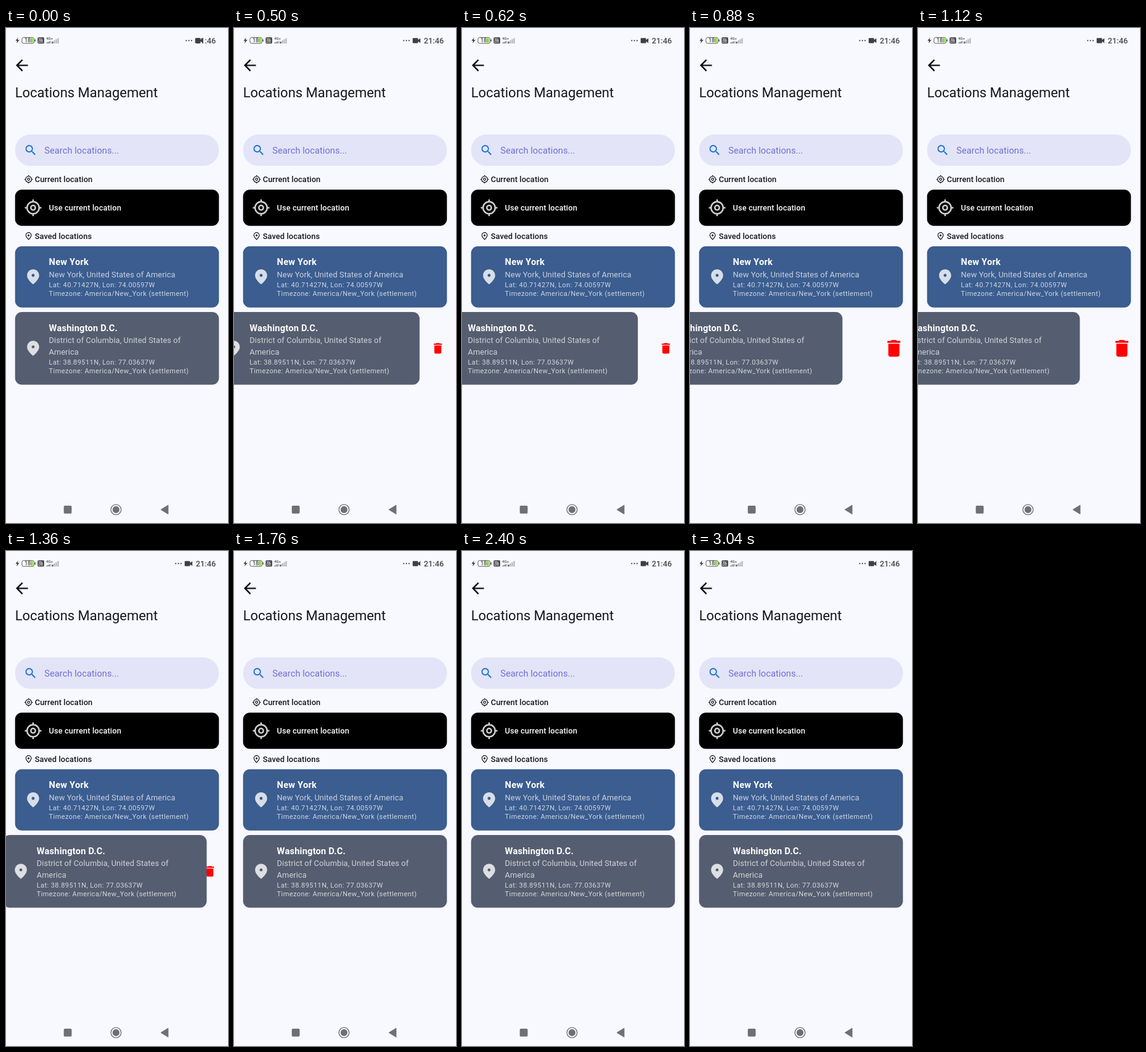
Write an HTML page that moves like this. It is 360 by 800 pixels and loops after 3240 ms.

```html
<!DOCTYPE html>
<html lang="en">
<head>
<meta charset="utf-8">
<title>Locations Management</title>
<style>
  html, body { margin: 0; width: 100%; height: 100%; overflow: hidden; background: #f8f8ff; }
  svg { display: block; width: 360px; height: 800px; }
  text { font-family: Roboto, "Noto Sans", sans-serif; fill: #15161b; white-space: pre; }
  .title { font-size: 22px; }
  .head { font-size: 12.83px; font-weight: 500; letter-spacing: .09px; }
  .hint { font-size: 14.67px; letter-spacing: .04px; fill: #706fd2; }
  .card text { fill: #fff; }
  .card .name { font-size: 14.67px; font-weight: 700; letter-spacing: .2px; }
  .card .body { font-size: 12.83px; letter-spacing: .09px; fill-opacity: .72; }
  .card .small { font-size: 11px; letter-spacing: .42px; fill-opacity: .75; }
  .status text { font-weight: 500; fill: #47474b; }
</style>
</head>
<body>
<svg viewBox="0 0 360 800">
  <defs>
    <path id="pin" d="M12 2c-4.2 0-8 3.22-8 8.2 0 3.18 2.45 6.92 7.34 11.23.38.33.95.33 1.33 0C17.55 17.12 20 13.38 20 10.2 20 5.22 16.2 2 12 2zm0 10c-1.1 0-2-.9-2-2s.9-2 2-2 2 .9 2 2-.9 2-2 2z"/>
    <g id="gps" fill="none" stroke-width="2">
      <circle cx="12" cy="12" r="8"/>
      <circle cx="12" cy="12" r="3"/>
      <path d="M12 1v3M12 20v3M1 12h3M20 12h3"/>
    </g>
  </defs>
  <rect width="360" height="800" fill="#f8f8ff"/>

  <g class="status">
    <path d="M19.5 15.5l-4 5.2h2.6l-1 4.3 4.6-5.7h-2.8z" fill="#3c3c40"/>
    <rect x="25.9" y="15.4" width="19.6" height="9.4" rx="2.8" fill="#fff" stroke="#56565a"/>
    <rect x="40" y="16.6" width="3.8" height="7" rx="1" fill="#7be02a"/>
    <rect x="46.4" y="18.3" width="1.5" height="3.6" rx=".7" fill="#56565a"/>
    <text x="30" y="23.4" font-size="9">18</text>
    <rect x="51.3" y="15" width="10.6" height="10.2" rx="1.6" fill="#48484c"/>
    <text x="53" y="19.8" font-size="5" style="fill:#fff">Vo</text>
    <text x="52.5" y="24.4" font-size="4.6" style="fill:#fff">LTE</text>
    <text x="65" y="19" font-size="6">4G+</text>
    <g id="bars"></g>
    <text x="307.8" y="25" font-size="12.8">21:46</text>
    <g id="rec" fill="#3f3f43">
      <circle cx="275.3" cy="20.3" r="1.1"/>
      <circle cx="279.6" cy="20.3" r="1.1"/>
      <circle cx="283.9" cy="20.3" r="1.1"/>
      <rect x="289.7" y="16.3" width="8.8" height="8.2" rx="1.2"/>
      <path d="M298 19.6l4.2-3v7.6l-4.2-3z"/>
    </g>
  </g>

  <path transform="translate(11.1 45.7) scale(1.222)" d="M20 11H7.83l5.59-5.59L12 4l-8 8 8 8 1.41-1.41L7.83 13H20z" fill="#111217"/>
  <text class="title" x="14.67" y="112">Locations Management</text>

  <rect x="14.7" y="172" width="330.6" height="50.8" rx="25" fill="#e4e4f8"/>
  <path transform="translate(28.7 186.2) scale(.94)" d="M15.5 14h-.79l-.28-.27A6.47 6.47 0 0 0 16 9.5 6.5 6.5 0 1 0 9.5 16c1.61 0 3.09-.59 4.23-1.57l.27.28v.79l5 4.99L20.49 19zm-6 0a4.5 4.5 0 1 1 0-9 4.5 4.5 0 0 1 0 9z" fill="#1976d2"/>
  <text class="hint" x="62.3" y="202.8">Search locations...</text>

  <use href="#gps" transform="translate(29.3 237.2) scale(.611)" stroke="#15161b"/>
  <text class="head" x="46.7" y="249">Current location</text>
  <g class="card">
    <rect x="14.7" y="261.2" width="330.6" height="58.6" rx="11" fill="#000"/>
    <use href="#gps" transform="translate(29.3 275.8) scale(1.222)" stroke="#d0d0d0"/>
    <text class="head" x="69.5" y="295">Use current location</text>
  </g>
  <g transform="translate(29.3 329) scale(.611)" fill="none" stroke="#15161b" stroke-width="2">
    <path d="M12 21C8 17 5 13.500 5 9.800a7 7 0 0 1 14 0C19 13.500 16 17 12 21z"/>
    <circle cx="12" cy="10" r="1.700"/>
  </g>
  <text class="head" x="46.7" y="340.9">Saved locations</text>

  <path id="bin" fill="#f00" d="M6 19c0 1.100.9 2 2 2h8c1.100 0 2-.9 2-2V7H6zM19 4h-3.500l-1-1h-5l-1 1H5v2h14z"/>
  <g class="card" id="first"></g>
  <g class="card" id="second"></g>

  <g fill="#707074">
    <rect x="93.700" y="772" width="12.800" height="12.800" rx="1.800"/>
    <circle cx="178.400" cy="778.400" r="8.300" fill="none" stroke="#707074" stroke-width="1.300"/>
    <circle cx="178.400" cy="778.400" r="5.600"/>
    <path d="M251 778.400l12-7.300v14.600z" stroke="#707074" stroke-width=".8" stroke-linejoin="round"/>
  </g>
</svg>
<script>
const $ = id => document.getElementById(id);
const LOOP = 3240, BIN_TIME = 160;

// Row height and baseline offset for each text style
const ROW = { name: [22, 16], body: [18.33, 13.55], small: [14.67, 11.1] };

function card(id, top, fill, rows) {
  let y = top + 14.67, texts = '';
  for (const [style, label] of rows) {
    const [height, base] = ROW[style];
    texts += `<text class="${style}" x="69.6" y="${y + base}">${label}</text>`;
    y += height;
  }
  const h = y + 14.67 - top;
  $(id).innerHTML = `<rect x="14.7" y="${top}" width="330.6" height="${h}" rx="11" fill="${fill}"/>
    <use href="#pin" transform="translate(29.3 ${top + h / 2 - 14.67}) scale(1.222)" fill="#fff" fill-opacity=".8"/>${texts}`;
}

card('first', 352.7, '#3b5d8f', [
  ['name', 'New York'],
  ['body', 'New York, United States of America'],
  ['small', 'Lat: 40.71427N, Lon: 74.00597W'],
  ['small', 'Timezone: America/New_York (settlement)']
]);
card('second', 459.1, '#555e70', [
  ['name', 'Washington D.C.'],
  ['body', 'District of Columbia, United States of'],
  ['body', 'America'],
  ['small', 'Lat: 38.89511N, Lon: 77.03637W'],
  ['small', 'Timezone: America/New_York (settlement)']
]);

// Two rows of signal bars: a short one under the network label, a tall one beside it
function bars(x, step, low, rise, n, lit) {
  for (let i = 0; i < n; i++) {
    const h = low + i * rise;
    $('bars').innerHTML += `<rect x="${x + i * step}" y="${25 - h}" width="${step - .9}" height="${h}" fill="${i < lit ? '#55555a' : '#b4b4ba'}"/>`;
  }
}
bars(65.5, 2.2, 1.5, 1, 4, 3);
bars(74.5, 3, 3, 1.9, 4, 1);

// Time and horizontal offset of the swiped card
const SWIPE = [[120, 0], [360, -27], [620, -60], [880, -98], [970, -102],
  [1120, -83], [1360, -20], [1600, 0]];

const slope = (a, b) => (b[1] - a[1]) / (b[0] - a[0]);
function tangent(i) {
  if (i === 0 || i === SWIPE.length - 1) return 0;
  const a = slope(SWIPE[i - 1], SWIPE[i]), b = slope(SWIPE[i], SWIPE[i + 1]);
  return a * b > 0 ? 2 * a * b / (a + b) : 0;
}
function swipe(t) {
  const i = SWIPE.findIndex(p => p[0] > t) - 1;
  if (i < 0) return 0;
  const [t0, x0] = SWIPE[i], [t1, x1] = SWIPE[i + 1];
  const d = t1 - t0, u = (t - t0) / d, v = 1 - u;
  return v * v * ((1 + 2 * u) * x0 + u * d * tangent(i))
    + u * u * ((3 - 2 * u) * x1 - v * d * tangent(i + 1));
}

const ease = (t, start, length) => {
  const u = Math.min(1, Math.max(0, (t - start) / length));
  return u * u * (3 - 2 * u);
};

function draw(t) {
  $('rec').setAttribute('transform', `translate(${17 * (1 - ease(t, 20, 260))} 0)`);
  $('second').setAttribute('transform', `translate(${swipe(t)} 0)`);
  const grow = ease(t, 700, BIN_TIME) - ease(t, 1165, BIN_TIME);
  $('bin').setAttribute('transform',
    `translate(330.6 517.7) scale(${.95 + .55 * grow}) translate(-12 -12)`);
}

const start = performance.now();
function tick() {
  draw((performance.now() - start) % LOOP);
  requestAnimationFrame(tick);
}
tick();
</script>
</body>
</html>
```
